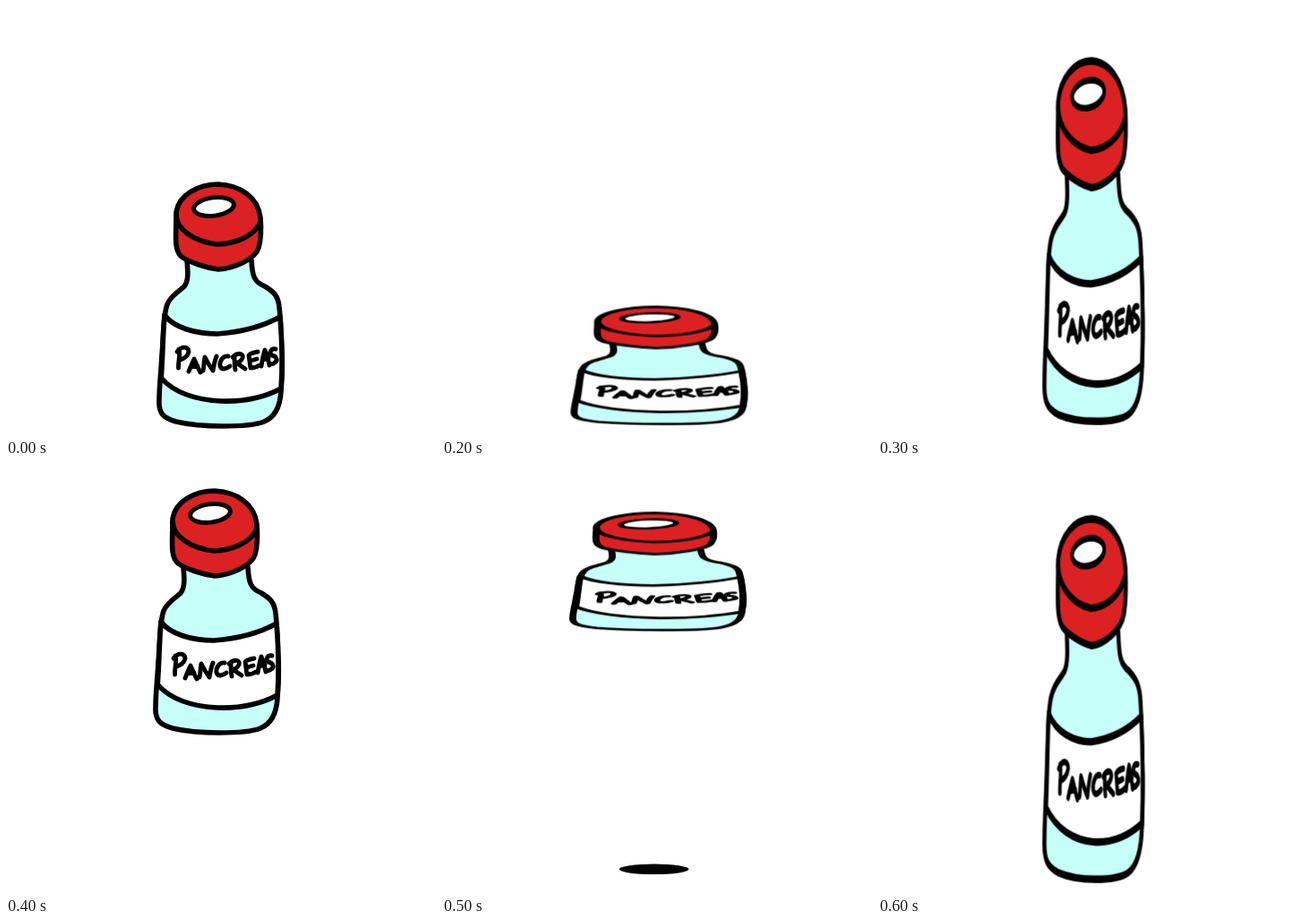
Recreate the animation shown at these times as an HTML page. Size 480 by 480 pixels, loop 700 ms.

```html
<!DOCTYPE html>
<html lang="en">
<head>
<meta charset="utf-8">
<title>Bouncing vial</title>
<style>
  html, body { margin: 0; width: 100%; height: 100%; overflow: hidden; background: #fff; }
  svg { display: block; width: 100vw; height: 100vh; }
  .ink { fill: none; stroke: #000; stroke-width: 5.6; stroke-linecap: round; stroke-linejoin: round; }
  .glass { fill: #c6fff8; }
  .paper { fill: #fff; }
  .cap { fill: #dc2122; }
  .vial { animation: bounce 700ms step-end infinite; }
  .shadow { opacity: 0; animation: shadow 700ms step-end infinite; }

  /* rest, squash, stretch, rise, squash in the air, stretch */
  @keyframes bounce {
    0%      { transform: none; }
    28.57%  { transform: matrix(1.385, 0, 0, .484, -89.3, 239.6); }
    42.857% { transform: matrix(.8, 0, 0, 1.49, 49, -235.3); }
    57.14%  { transform: translate(-4px, -169px); }
    71.428% { transform: matrix(1.385, 0, 0, .484, -90.8, -41.6); }
    85.714% { transform: matrix(.8, 0, 0, 1.49, 49, -235.3); }
  }
  @keyframes shadow {
    0%, 85.714% { opacity: 0; }
    71.428% { opacity: 1; }
  }
</style>
</head>
<body>
<svg viewBox="0 0 480 480" role="img" aria-label="Vial labelled PANCREAS">
  <ellipse class="shadow" cx="236.7" cy="452.3" rx="38.8" ry="5.8"/>
  <g class="vial">
    <!-- body -->
    <path class="ink glass" d="M202 284 C203 296 204 307 199 313 C193 319 184 323 180 333
      C175 347 176 368 174 390 C173 410 171 425 171 440 C170 455 176 460 190 464
      C207 468 225 469 242 469 C262 469 278 468 288 464 C300 459 306 448 307 430
      C308 415 309 402 308 388 C307 370 307 352 305 336 C304 324 299 319 289 313
      C277 308 275 302 274 284"/>
    <!-- label -->
    <path class="paper" d="M177 346 C187 359 212 366 236 366 C263 364 288 357 306 346
      C307 360 308 375 308 390 L307 427 C290 437 266 442 240 441 C212 440 186 431 173 417
      C174 392 175 370 177 346Z"/>
    <path class="ink" d="M177 345 C187 359 212 366 236 366 C263 364 288 357 306 347
      M174 416 C187 431 212 440 240 441 C266 442 290 436 307 427
      M177 345 C175 370 175 392 173 418 M306 347 C308 372 309 400 307 428"/>
    <!-- cap -->
    <path class="ink cap" d="M190 230 C193 211 214 199 237 199 C261 200 281 213 284 236
      C285 248 285 260 282 270 C278 283 254 293 237 294 C222 292 205 286 196 280
      C187 272 190 256 190 230Z"/>
    <path class="ink" d="M190 234 C191 250 210 263 236 266 C257 265 276 257 283 243"/>
    <ellipse class="ink paper" style="stroke-width:5" cx="232" cy="224" rx="22.5" ry="10.2" transform="rotate(-7 232 224)"/>
    <!-- hand lettering -->
    <path class="ink" style="stroke-width:4.9" d="M193 383 C195 390 192 397 192.500 404 M191 386 C196 379 204 380 204 386 C203 391 198 394 194 395
      M204 408 C206 403 208 398 210 394 C212 398 214 404 217 409 M206 403 L214 402
      M220 407 C221 402 221 397 222 392 C225 398 228 403 231 407 C232 401 233 396 235 391
      M248 391 C242 390 238 397 239 402 C241 407 246 405 250 402
      M255 391 C255 396 255 401 256 406 M253 392 C259 386 266 388 264 393 C262 397 259 398 257 398 C261 401 264 403 267 405
      M281 386 C276 387 272 388 271 390 C272 395 272 399 273 404 C276 404 280 403 283 401 M273 396 L280 394
      M285 402 C286 396 287 390 289 384 C291 389 293 395 294 401 M287 395 L293 393
      M301 383 C296 382 293 387 297 390 C302 391 304 396 300 398 C298 400 296 400 295 399"/>
  </g>
</svg>
</body>
</html>
```
